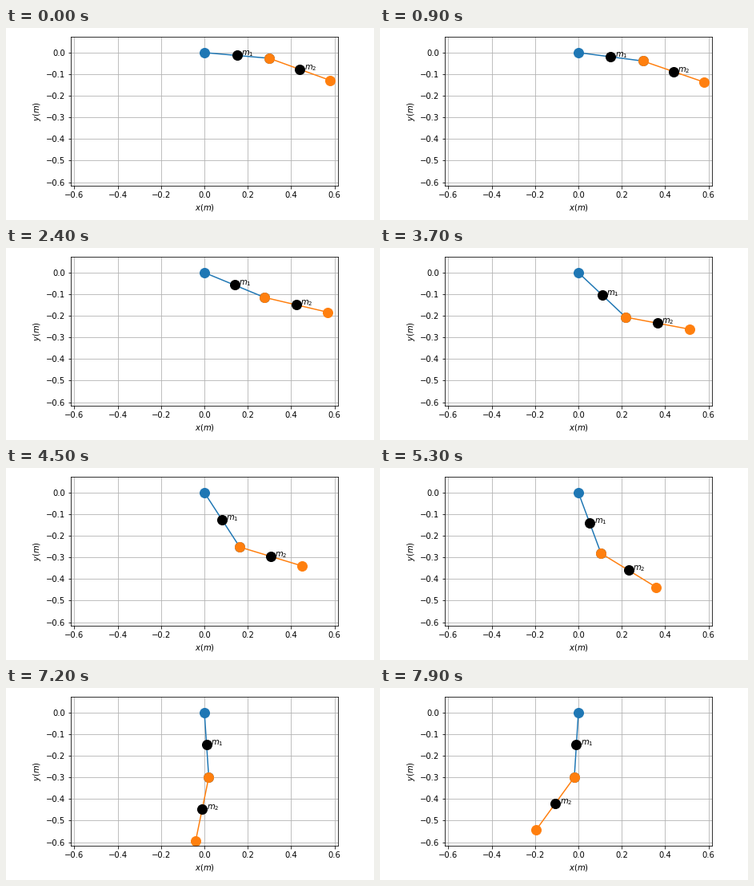
Animation, 460 px wide and 241 px high, one loop 8000 ms. Source, as a matplotlib script:

```python
import matplotlib.pyplot as plt
import numpy as np
from matplotlib.animation import FuncAnimation

W, H, DPI = 460, 241, 72
FRAMES, INTERVAL = 80, 100

# Two equal uniform rods, angles measured from straight down
LENGTH, G = 0.3, 9.81
DT, SUBSTEPS = 0.005, 4
START = np.radians([85, 70])


def derivative(state):
    t1, t2, w1, w2 = state
    c, s = np.cos(t1 - t2), np.sin(t1 - t2)
    k = G / LENGTH
    mass = np.array([[4 / 3, c / 2], [c / 2, 1 / 3]])
    force = np.array([
        -s * w2**2 / 2 - 1.5 * k * np.sin(t1),
        s * w1**2 / 2 - 0.5 * k * np.sin(t2),
    ])
    a1, a2 = np.linalg.solve(mass, force)
    return np.array([w1, w2, a1, a2])


def rk4(state, h):
    k1 = derivative(state)
    k2 = derivative(state + h / 2 * k1)
    k3 = derivative(state + h / 2 * k2)
    k4 = derivative(state + h * k3)
    return state + h / 6 * (k1 + 2 * k2 + 2 * k3 + k4)


def simulate():
    state = np.array([*START, 0.0, 0.0])
    angles = []
    for _ in range(FRAMES):
        angles.append(state[:2])
        for _ in range(SUBSTEPS):
            state = rk4(state, DT / SUBSTEPS)
    return np.array(angles)


def rod(angle):
    return LENGTH * np.array([np.sin(angle), -np.cos(angle)])


plt.rcParams.update({"font.family": "DejaVu Sans", "font.size": 10})
fig = plt.figure(figsize=(W / DPI, H / DPI), dpi=DPI, facecolor="white")

# Plot box and origin in pixels from the top left
LEFT, RIGHT, TOP, BOTTOM = 81.0, 415.4, 11.4, 198.4
OX, OY, SCALE = 248.0, 30.9, 271.1
ax = fig.add_axes([LEFT / W, 1 - BOTTOM / H, (RIGHT - LEFT) / W, (BOTTOM - TOP) / H])
ax.set_xlim((LEFT - OX) / SCALE, (RIGHT - OX) / SCALE)
ax.set_ylim((OY - BOTTOM) / SCALE, (OY - TOP) / SCALE)
ax.set_xticks(np.linspace(-0.6, 0.6, 7).round(1))
ax.set_yticks(np.linspace(-0.6, 0, 7).round(1))
ax.set_xlabel("$x(m)$")
ax.set_ylabel("$y(m)$")
ax.grid(True)

links = [ax.plot([], [], "o-", color=c, ms=12)[0] for c in ("tab:blue", "tab:orange")]
masses = [ax.plot([], [], "o", color="black", ms=12)[0] for _ in range(2)]
labels = [ax.text(0, 0, f"$m_{i}$") for i in (1, 2)]

angles = simulate()


def update(i):
    start = np.zeros(2)
    for angle, link, mass, label in zip(angles[i], links, masses, labels):
        end = start + rod(angle)
        x, y = (start + end) / 2
        link.set_data([start[0], end[0]], [start[1], end[1]])
        mass.set_data([x], [y])
        label.set_position((x + 0.02, y))
        start = end
    return links + masses + labels


anim = FuncAnimation(fig, update, frames=FRAMES, init_func=lambda: update(0),
                     interval=INTERVAL, repeat=True, repeat_delay=0)
plt.show()
```
